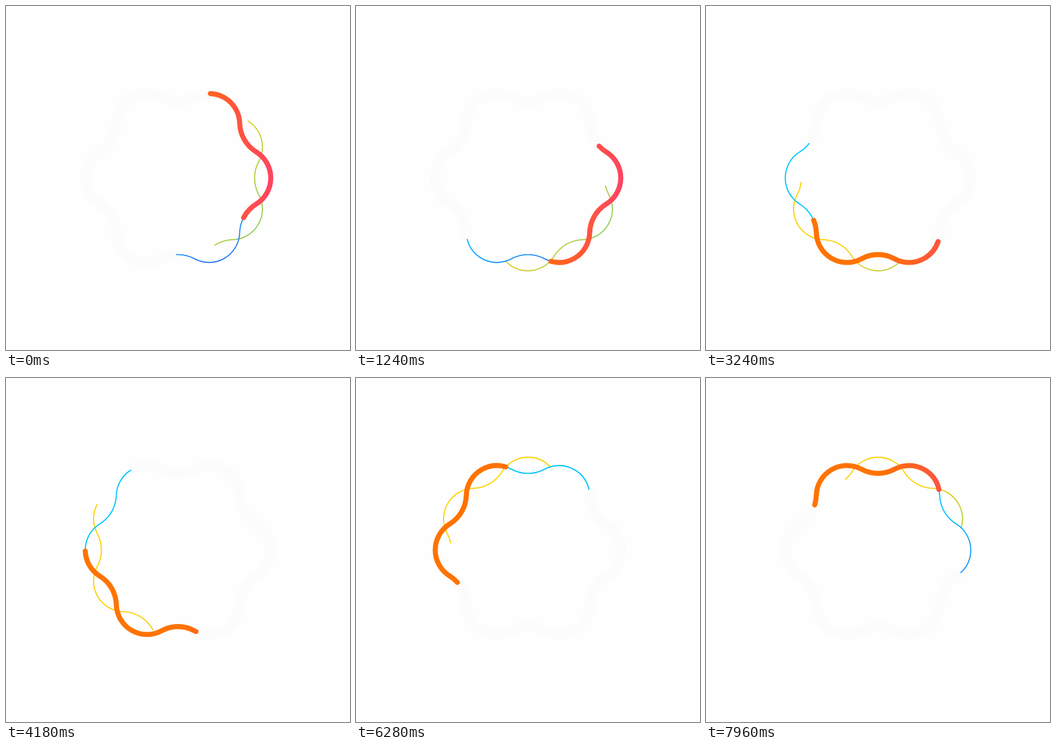
Animation of 640 by 640 pixels, one loop 8 s. Source, as an HTML page with a canvas:

```html
<!DOCTYPE html>
<html lang="en">
<head>
<meta charset="utf-8">
<title>Wavy loader</title>
<style>
  html, body { margin: 0; width: 100%; height: 100%; overflow: hidden; background: #fefefe; }
  canvas { display: block; width: 640px; height: 640px; }
</style>
</head>
<body>
<canvas id="stage" width="640" height="640"></canvas>
<script>
const ctx = document.getElementById('stage').getContext('2d');
const RAD = Math.PI / 180;

// Six-lobed ring: convex lobe arcs joined by tangent concave arcs
const RING = 115.6;     // distance of lobe centres
const LOBE = 57;        // lobe radius
const VALLEY = 142.5;   // distance of the valley bottoms
const halfGap = RING / 2;
const rise = VALLEY - RING * Math.cos(30 * RAD);
const DIP = (halfGap ** 2 + rise ** 2 - LOBE ** 2) / (2 * (LOBE - rise));
const dipHalf = Math.atan2(halfGap, rise + DIP);
const lobeHalf = dipHalf + 30 * RAD;
const unit = 2 * (lobeHalf * LOBE + dipHalf * DIP);
const total = 6 * unit;

function buildRing() {
  const p = new Path2D();
  for (let i = 0; i < 6; i++) {
    const a = i * 60 * RAD, b = a + 30 * RAD, c = a + 60 * RAD;
    const out = VALLEY + DIP;
    p.arc(RING * Math.cos(a), RING * Math.sin(a), LOBE, a, a + lobeHalf);
    p.arc(out * Math.cos(b), out * Math.sin(b), DIP,
          b + Math.PI + dipHalf, b + Math.PI - dipHalf, true);
    p.arc(RING * Math.cos(c), RING * Math.sin(c), LOBE, c - lobeHalf, c);
  }
  p.closePath();
  return p;
}

function fade(from, to) {
  const g = ctx.createLinearGradient(0, 0, RING + LOBE, 0);
  g.addColorStop(0, from);
  g.addColorStop(1, to);
  return g;
}

const ring = buildRing();
const SPAN = 0.28 * 6;  // strand length, in lobes
const strands = [
  { turn: 30, width: 2.1, color: fade('#ffd000', '#94cd5a') },
  { turn: 60, width: 2.1, color: fade('#00c4ff', '#2c7bff') },
  { turn: 0, width: 9.4, color: fade('#ff7300', '#ff4560') }
];

// Stroke part of the ring; start and length are in lobes
function strokePart(start, length, width, color, cap) {
  ctx.lineWidth = width;
  ctx.strokeStyle = color;
  ctx.lineCap = cap;
  ctx.setLineDash([length * unit, total - length * unit]);
  ctx.lineDashOffset = total - ((start % 6 + 6) % 6) * unit;
  ctx.stroke(ring);
}

const LOOP = 8000, FIRST = 120, BEAT = 560;
const starts = [0, 140, 230, 320, 440];

function stepAt(t) {
  const u = t - FIRST;
  if (u < 0) return 0;
  const beat = Math.floor(u / BEAT);
  return beat * 5 + starts.filter(s => s <= u - beat * BEAT).length;
}

function draw(t) {
  const head = 0.515 + stepAt(t) / 15;
  ctx.setTransform(1, 0, 0, 1, 0, 0);
  ctx.fillStyle = '#fefefe';
  ctx.fillRect(0, 0, 640, 640);
  ctx.translate(320, 320);
  strokePart(head + 1, 5 - SPAN, 18.8, '#fcfcfc', 'butt');
  for (const s of strands) {
    ctx.save();
    ctx.rotate(s.turn * RAD);
    strokePart(head - SPAN, SPAN, s.width, s.color, 'round');
    ctx.restore();
  }
}

const begin = performance.now();
function tick() {
  draw((performance.now() - begin) % LOOP);
  requestAnimationFrame(tick);
}
tick();
</script>
</body>
</html>
```
